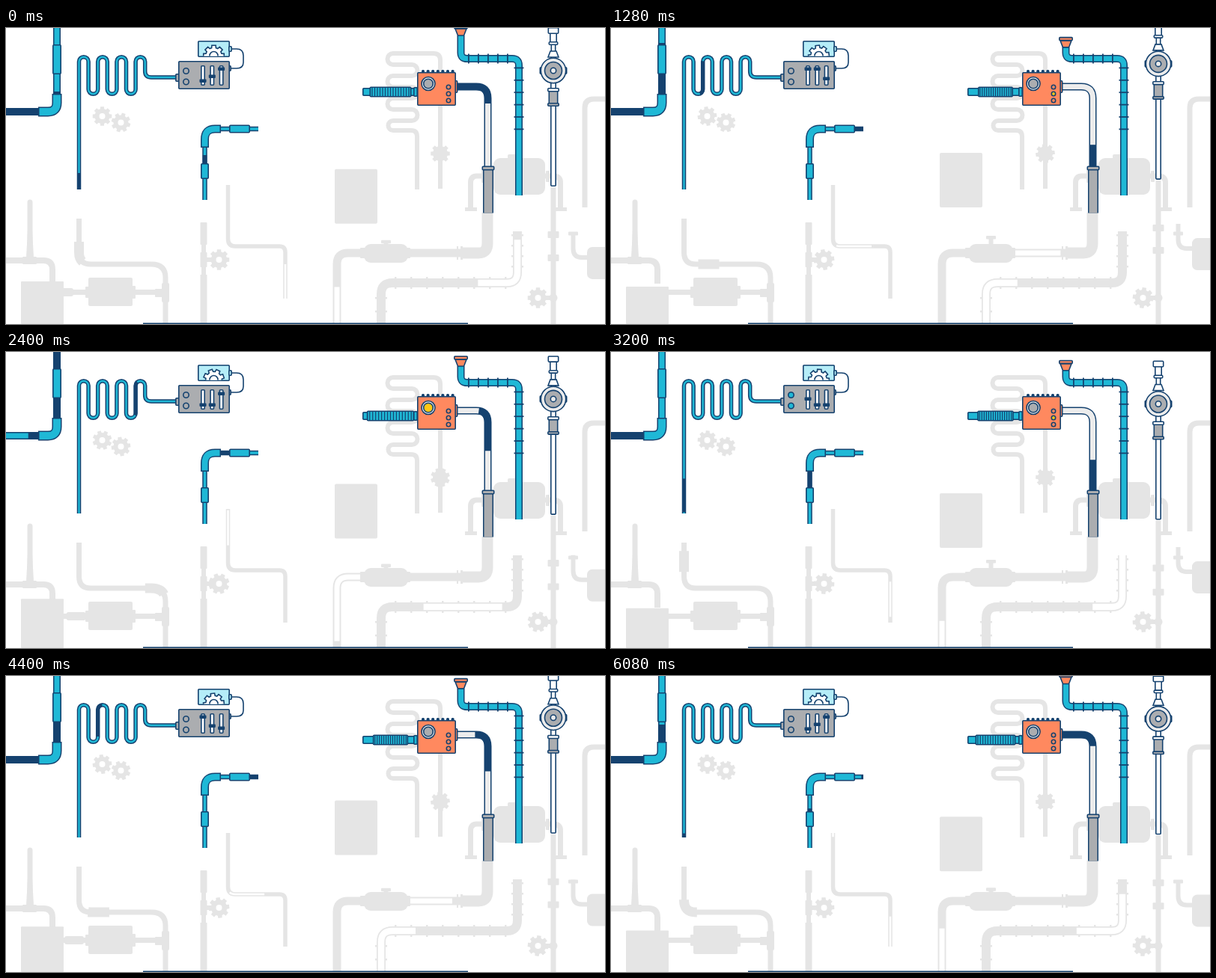
Recreate the animation shown at these times as an HTML page with a canvas. Size 800 px wide and 396 px high, loop 6.16 s.

```html
<!DOCTYPE html>
<html lang="en">
<head>
<meta charset="utf-8">
<title>Pipe works</title>
<style>
html, body { margin: 0; width: 100%; height: 100%; overflow: hidden; background: #fff; }
canvas { display: block; width: 800px; height: 396px; }
</style>
</head>
<body>
<canvas id="stage" width="800" height="396"></canvas>
<script>
const ctx = document.getElementById('stage').getContext('2d');
const LOOP = 6160, STEP = 80;
const SLOW = LOOP / 2, MID = LOOP / 3, FAST = LOOP / 4;
const NAVY = '#15426f', TEAL = '#1fb8d6', GREY = '#abadb0', ORANGE = '#ff895f',
  PALE = '#b5edf8', FAINT = '#e5e5e5', LIGHT = '#ececec', YELLOW = '#ffc814', WHITE = '#fff';

const P = d => new Path2D(d);

// Cosine ease through [time, value] pairs
function track(keys, t) {
  let i = 0;
  while (i < keys.length - 2 && t >= keys[i + 1][0]) i++;
  const [t0, a] = keys[i], [t1, b] = keys[i + 1];
  const u = Math.min(1, Math.max(0, (t - t0) / (t1 - t0)));
  return a + (b - a) * (1 - Math.cos(Math.PI * u)) / 2;
}
const wave = (t, period, mid, amp, peak) =>
  mid + amp * Math.cos(2 * Math.PI * (t / period - peak));

function line(path, w, color, cap = 'butt') {
  ctx.lineWidth = w;
  ctx.strokeStyle = color;
  ctx.lineCap = cap;
  ctx.stroke(path);
}
function tube(path, w, fill) {
  line(path, w, NAVY);
  line(path, w - 3, fill);
}
// Repeating plug of liquid running along a path
function flow(path, t, head, speed, len, period, w, color) {
  ctx.setLineDash([len, Math.abs(speed) * period - len]);
  ctx.lineDashOffset = len - head - speed * t;
  line(path, w, color);
  ctx.setLineDash([]);
  ctx.lineDashOffset = 0;
}
function rect(x, y, w, h, color, r = 0) {
  ctx.fillStyle = color;
  ctx.beginPath();
  ctx.roundRect(x, y, w, h, r);
  ctx.fill();
}
function paint(fill, edge) {
  ctx.fillStyle = fill;
  ctx.fill();
  if (!edge) return;
  ctx.lineWidth = 1.6;
  ctx.strokeStyle = edge;
  ctx.stroke();
}
function block(x, y, w, h, fill, r = 1) {
  ctx.beginPath();
  ctx.roundRect(x + .8, y + .8, w - 1.6, h - 1.6, r);
  paint(fill, NAVY);
}
function disc(x, y, r, fill, edge) {
  ctx.beginPath();
  ctx.arc(x, y, r, 0, 7);
  paint(fill, edge);
}
function poly(pts, fill, edge) {
  ctx.beginPath();
  pts.forEach(([x, y]) => ctx.lineTo(x, y));
  ctx.closePath();
  paint(fill, edge);
}
function gear(x, y, r, hole, angle, fill, edge) {
  const pts = [];
  for (let i = 0; i < 8; i++) {
    const a = angle + i * Math.PI / 4;
    for (const [d, k] of [[-.27, .77], [-.19, 1], [.19, 1], [.27, .77]])
      pts.push([x + r * k * Math.cos(a + d), y + r * k * Math.sin(a + d)]);
  }
  poly(pts, fill, edge);
  if (hole) disc(x, y, hole, WHITE, edge);
}

const coil = P('M580 215V43Q580 34 571 34H517a7.5 7.5 0 0 0 0 15H542a7.5 7.5 0 0 1 0 15H517' +
  'a7.5 7.5 0 0 0 0 15H542a7.5 7.5 0 0 1 0 15H517a7.5 7.5 0 0 0 0 15H542' +
  'a7.5 7.5 0 0 1 0 15H517a6.5 6.5 0 0 0 0 13H541Q549 137 549 145V216');
const hook = P('M773 240V107Q773 95 785 95H800');
const legs = P('M620.5 243V207Q620.5 198 629 198H731Q740.5 198 740.5 207V243');
const corner = P('M0 311H50Q62 311 62 323V342');
const bulged = P('M97.5 255V300Q97.5 316 113 316H194Q213 316 213 334V395');
const thin = P('M373 362V300Q373 292 365 292H306Q296.5 292 296.5 282V210');
const thick = P('M643 247V288Q643 301 631 301H457Q442 301 442 316V395');
const sleeve = P('M643 247V288Q643 301 631 301H607');
const ribbed = P('M501 395V356Q501 341 516 341H669Q683 341 683 327V272');

const feed = P('M68 0V100A12 12 0 0 1 56 112H-5');
const over = 'a6.3 6.3 0 0 1 12.6 0V82', under = 'a6.3 6.3 0 0 0 12.6 0V45';
const snake = P('M97.5 216V45' + (over + under).repeat(3) +
  'a6.3 6.3 0 0 1 12.6 0V58Q185.7 66 194 66H235');
const bend = P('M265.5 230V149Q265.5 135 279 135H337');
const bendFill = P('M265.5 190V149Q265.5 135 279 135H337');
const spout = P('M600 78.5H628Q643.5 78.5 643.5 94V190');

function faintParts(t, g) {
  const spin = t / LOOP * Math.PI;
  line(coil, 6, FAINT);
  line(hook, 7, FAINT);
  gear(580, 168, 13, 0, spin, FAINT);
  gear(128.5, 118, 13, 4, spin, FAINT);
  gear(153.5, 126.5, 13, 4, -spin + .3, FAINT);
  rect(439, wave(t, SLOW, 176.5, 12.5, .03), 57, 73, FAINT, 2);

  // tank on legs
  line(legs, 7, FAINT);
  rect(613, 240, 16, 5, FAINT);
  rect(733, 240, 16, 5, FAINT);
  rect(651, 174, 69, 49, FAINT, 9);
  rect(635, 189, 6, 18, FAINT, 1);
  rect(721, 191, 5, 15, FAINT, 1);
  rect(670, 169, 12, 6, FAINT, 2);

  // lower left boxes
  line(P('M32 233V306'), 7, FAINT, 'round');
  poly([[29, 270], [35, 270], [37, 307], [27, 307]], FAINT);
  rect(22, 306, 19, 10, FAINT, 1);
  line(corner, 8, FAINT);
  const boxY = track([[0, 339], [1000, 348], [2300, 330], [3500, 345], [5200, 327], [6300, 342]], t);
  rect(20, boxY, 57, 396 - boxY, FAINT, 1);
  rect(76, 350, 126, 7, FAINT);
  const lump = 77 + ((t / MID) % 1) * 98;
  if (lump < 120) rect(lump - 13, 348, 26, 11, FAINT, 3);
  rect(106, 346, 6, 15, FAINT, 1);
  rect(110, 334, 59, 38, FAINT, 2);
  rect(167, 345, 6, 17, FAINT, 1);

  line(bulged, 7, FAINT);
  flow(bulged, t, 59, -.165, 28, FAST, 13, FAINT);
  rect(199, 349, 12, 11, FAINT, 1);
  rect(208, 341, 10, 26, FAINT, 2);

  rect(259.5, 260, 9, 30, FAINT, 1);
  rect(261, 289, 6, 14, FAINT);
  rect(259.5, 300, 9, 20, FAINT, 1);
  rect(261, 319, 6, 12, FAINT);
  rect(259.5, 330, 9, 66, FAINT);
  rect(267, 307, 10, 6, FAINT);
  gear(284.5, 310, 14, 4, spin, FAINT);

  line(thin, 5.5, FAINT);
  flow(thin, t, 46, .0724, 47, SLOW, 2.5, WHITE);

  line(thick, 11, FAINT);
  flow(thick, t, 66, .11, 115, SLOW, 7, WHITE);
  line(sleeve, 15, FAINT);
  rect(602, 292, 2, 18, FAINT);
  rect(607, 292, 3, 18, FAINT);
  rect(473, 294, 8, 14, FAINT, 1);
  rect(534, 294, 6, 14, FAINT, 1);
  rect(478, 289, 59, 25, FAINT, 9);
  const cap = wave(t, MID, 281, 3, .08);
  rect(501, cap, 13, 4.5, FAINT, 1);
  rect(504.5, cap + 2, 6, 290 - cap, FAINT);

  line(ribbed, 12, FAINT);
  for (let x = 519; x < 670; x += 21) rect(x, 333, 2.5, 16, FAINT);
  for (let y = 276; y < 330; y += 14) rect(675, y, 16, 2.5, FAINT);
  for (let y = 360; y < 390; y += 18) rect(493, y, 16, 2.5, FAINT);
  flow(ribbed, t, -47, .107, 105, SLOW, 8.5, WHITE);

  // column below the gauge
  rect(727.5, g + 156, 7, 396 - g - 156, FAINT);
  rect(723.5, g + 215, 15, 9, FAINT, 1);
  rect(723.5, 293 + (g - 48) * 1.1, 15, 9, FAINT, 1);
  rect(719, 358, 10, 6, FAINT);
  gear(710.5, 361, 14, 4, -spin, FAINT);
  disc(731, 361, 5.5, FAINT);

  const tankY = wave(t, MID, 286.5, 6.5, .03);
  ctx.save();
  ctx.translate(0, tankY - 293);
  line(P('M757.5 274V295Q757.5 307 769 307H777'), 6, FAINT);
  rect(776, 293, 34, 43, FAINT, 7);
  ctx.restore();
  rect(751, 272.5, 13, 5, FAINT, 1);
}

function leftMachine(t) {
  tube(feed, 10, TEAL);
  flow(feed, t, -70, .25, 230, FAST, 8.5, NAVY);
  block(62, 22, 12, 40, TEAL);
  line(P('M68 88V100Q68 112 56 112H43'), 13, NAVY);
  line(P('M68 89.5V100Q68 112 56 112H44.5'), 10, TEAL);

  tube(snake, 5.5, TEAL);
  flow(snake, t, 22, .205, 45, SLOW, 4.5, NAVY);

  line(P('M301 28H308Q317 28 317 37V46Q317 54 308 54H299'), 1.6, NAVY);
  block(256, 17, 43, 22, PALE);
  ctx.save();
  ctx.beginPath();
  ctx.rect(257.5, 18.5, 40, 19);
  ctx.clip();
  gear(277.5, 37, 14, 5.5, t / LOOP * Math.PI, WHITE, NAVY);
  ctx.restore();
  block(297, 24, 5, 8, PALE);
  block(226, 61, 6, 11, GREY);
  block(297, 50, 4, 8, GREY);
  block(230, 44, 69, 38, GREY);
  const lamp = t >= 2960 && t < 3360 ? TEAL : GREY;
  disc(240.5, 57.5, 3.7, lamp, NAVY);
  disc(240.5, 72, 3.7, lamp, NAVY);

  const times = [0, 1280, 2400, 3200, 4400, 5360, 6080];
  [[70, 54, 70, 62, 54, 54, 70], [64, 54, 70, 70, 66, 61, 64], [54, 67, 55, 70, 69, 58, 54]]
    .forEach((ys, i) => {
      const x = 260 + i * 12.3;
      block(x, 50, 6, 27, WHITE);
      rect(x - 1.5, track(times.map((k, n) => [k, ys[n]]), t) - 1.5, 9, 4.5, NAVY, 1);
    });

  tube(bend, 6.5, TEAL);
  flow(bendFill, t, 20, .09, 33, FAST, 5.5, NAVY);
  block(260, 181, 11, 21, TEAL);
  line(P('M265.5 160V149Q265.5 135 279 135H287'), 11, NAVY);
  line(P('M265.5 158.5V149Q265.5 135 279 135H285.5'), 8, TEAL);
  block(298, 129.5, 28, 11, TEAL);
}

function rightMachine(t) {
  // bellows
  block(476, 80, 72, 11, TEAL);
  const half = track([[0, 28], [180, 23], [800, 32], [1290, 23.5], [1540, 28]], t % FAST);
  block(513.5 - half, 78.5, half * 2, 14, TEAL);
  const ribs = 16;
  for (let i = 1; i < ribs; i++)
    rect(513.5 - half + 2 * half * i / ribs - .6, 79, 1.2, 13, NAVY);
  block(544, 79, 6, 13, TEAL);

  tube(spout, 10, LIGHT);
  flow(spout, t, 60, .09, 60, MID, 8.5, NAVY);
  tube(P('M644 188V247.5'), 14, GREY);
  block(635.5, 184.5, 17, 6, GREY);

  for (let x = 555; x < 595; x += 6.6) rect(x, 56, 4, 5, NAVY, 1.5);
  block(599, 70, 4.5, 17, ORANGE);
  block(549, 59, 52, 45, ORANGE);
  const beat = (t / MID) % 1;
  disc(564, 74.5, 9, LIGHT, NAVY);
  disc(564, 74.5, 6.3, beat > .15 && beat < .4 ? YELLOW : GREY, NAVY);
  const lit = beat > .45 && beat < .75;
  [79, 88, 97].forEach((y, i) => disc(591, y, 2.7, lit && i === 1 ? YELLOW : ORANGE, NAVY));

  // funnel and ribbed pipe
  const f = track([[0, 10], [1100, 28], [1900, 10], [2900, 28], [4000, 9], [4900, 28], [5950, 10], [6800, 20]], t);
  tube(P(`M607.5 ${f}V33Q607.5 41 616 41H676Q685 41 685 50V224`), 10, TEAL);
  for (let x = 617; x < 676; x += 13) rect(x, 34.5, 1.8, 13, NAVY);
  for (let y = 52.5; y < 140; y += 16.4) rect(678.5, y, 13, 1.8, NAVY);
  poly([[600, f - 9], [615, f - 9], [611.5, f], [603.5, f]], ORANGE, NAVY);
  block(598, f - 14, 19, 5.5, ORANGE);
}

function gauge(g) {
  ctx.save();
  ctx.translate(731, g);
  block(-4, 14, 8, 141, WHITE);
  block(-3.5, -40, 7, 25, WHITE);
  block(-5, -51, 10, 14, WHITE);
  block(-7.5, -58, 15, 9, WHITE);
  block(-6.5, -39, 13, 5, WHITE);
  poly([[-4, -26], [4, -26], [7, -18], [-7, -18]], WHITE, NAVY);
  block(-18.5, -5, 5, 10, WHITE);
  block(13.5, -5, 5, 10, WHITE);
  disc(0, 0, 16.7, LIGHT, NAVY);
  disc(0, 0, 11.5, GREY, NAVY);
  disc(0, 0, 3.7, LIGHT, NAVY);
  block(-6.5, 26, 13, 20, GREY);
  block(-8, 23, 16, 5.5, WHITE);
  block(-8, 43, 16, 5, GREY);
  ctx.restore();
}

function draw(t) {
  const g = track([[-1150, 69.5], [1000, 47], [3200, 69.5], [5300, 47], [6950, 69.5]], t);
  rect(0, 0, 800, 396, WHITE);
  faintParts(t, g);
  leftMachine(t);
  rightMachine(t);
  gauge(g);
  rect(183, 394.5, 434, 1.5, NAVY);
}

const start = performance.now();
function tick() {
  const t = (performance.now() - start) % LOOP;
  draw(Math.floor(t / STEP) * STEP);
  requestAnimationFrame(tick);
}
tick();
</script>
</body>
</html>
```
